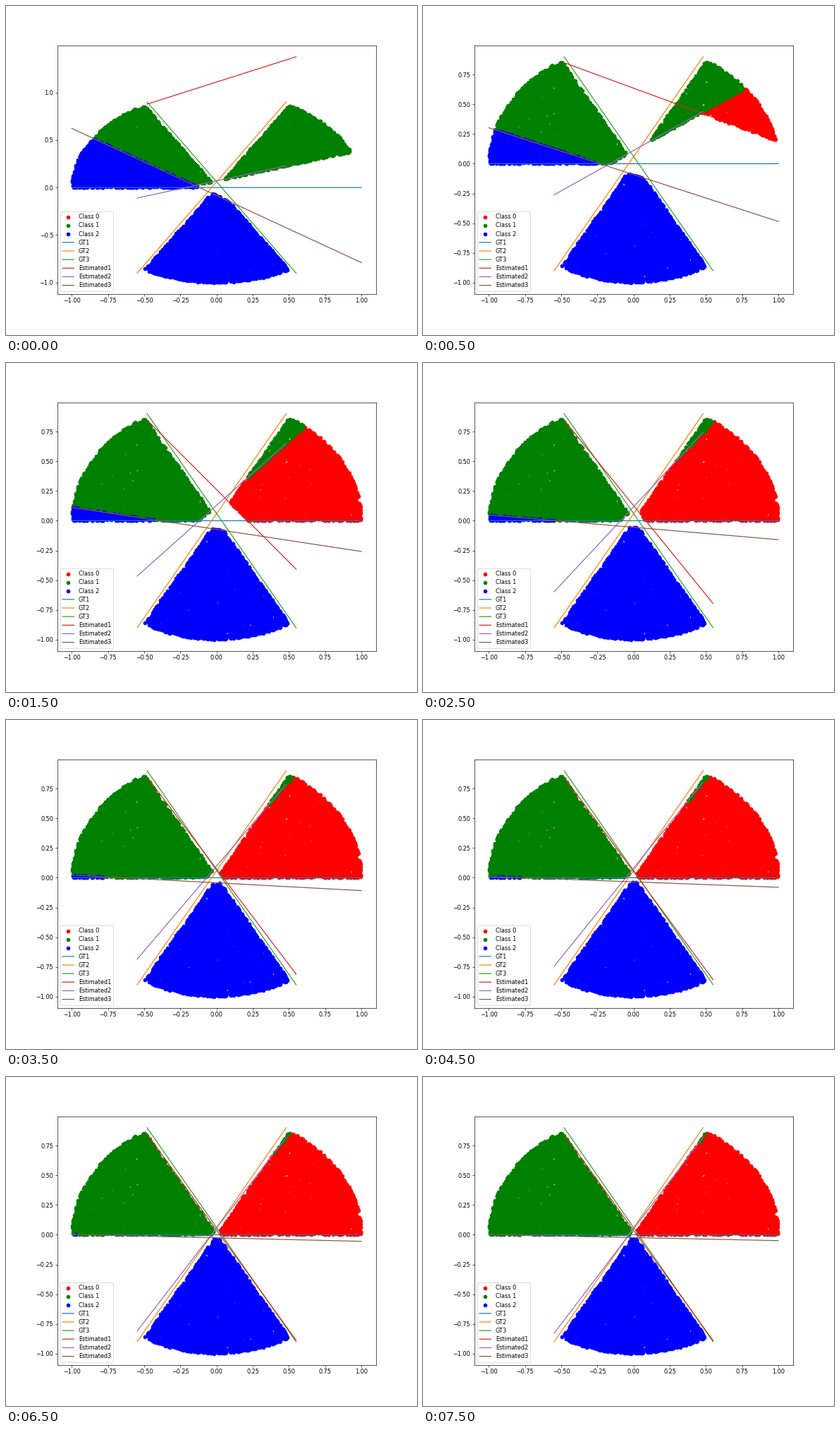
Recreate the animation shown at these times as a matplotlib script. Size 583x466 px, loop 8 s.

```python
import numpy as np
import matplotlib.pyplot as plt
from matplotlib.animation import FuncAnimation

DPI = 58.3
FRAMES, INTERVAL = 16, 500
PER_WEDGE = 5000

# Ground truth: y = +-SLOPE * x + OFFSET, drawn between y = -0.9 and 0.9
SLOPE, OFFSET, REACH = 1.75, 0.06, 0.9
LO, HI = (REACH + OFFSET) / SLOPE, (REACH - OFFSET) / SLOPE
RISING, FALLING, FLAT = (-LO, HI), (-HI, LO), (-1, 1)


def decay(step, start, end, rate, power):
    """Stretched exponential approach from start to end."""
    return end + (start - end) * np.exp(-rate * step ** power)


def estimates(step):
    """Span and end heights of the three fitted lines."""
    return (
        (FALLING, (decay(step, 0.878, 0.846, 2.0, 0.905),
                   decay(step, 1.376, -0.893, 0.57, 0.905))),
        (RISING, (decay(step, -0.11, -0.87, 0.222, 0.95),
                  decay(step, 0.228, 0.822, 0.44, 0.95))),
        (FLAT, (decay(step, 0.622, 0.0, 0.72, 0.785),
                decay(step, -0.79, -0.04, 0.52, 0.785))),
    )


def wedge(rng, start):
    angle = np.radians(start + 60 * rng.random(PER_WEDGE))
    radius = np.sqrt(rng.random(PER_WEDGE))
    return np.column_stack([radius * np.cos(angle), radius * np.sin(angle)])


def is_above(xs, ys):
    slope = (ys[1] - ys[0]) / (xs[1] - xs[0])
    return points[:, 1] > ys[0] + slope * (points[:, 0] - xs[0])


rng = np.random.default_rng(7)
points = np.vstack([wedge(rng, a) for a in (0, 120, 240)])

fig, ax = plt.subplots(figsize=(583 / DPI, 466 / DPI), dpi=DPI)
fig.subplots_adjust(left=0.125, right=0.9, bottom=0.125, top=0.88)
ax.set_xlim(-1.1, 1.1)

clouds = [ax.scatter([], [], color=c, label=f"Class {k}")
          for k, c in enumerate(("red", "green", "blue"))]

truths = ((FLAT, (0, 0)), (RISING, (-REACH, REACH)), (FALLING, (REACH, -REACH)))
for k, (xs, ys) in enumerate(truths, 1):
    ax.plot(xs, ys, label=f"GT{k}", snap=False)
lines = [ax.plot(xs, ys, label=f"Estimated{k}", snap=False)[0]
         for k, (xs, ys) in enumerate(estimates(0), 1)]

legend = ax.legend(loc="lower left", labelspacing=0.39)
for handle in legend.get_lines():
    handle.set_snap(False)


def update(step):
    fits = estimates(step)
    for line, (xs, ys) in zip(lines, fits):
        line.set_data(xs, ys)

    over1, over2, over3 = (is_above(xs, ys) for xs, ys in fits)
    groups = (over1 & ~over2 & over3, over2 & over3, ~over1 & ~over3)
    for cloud, mask in zip(clouds, groups):
        cloud.set_offsets(points[mask])

    top = max(REACH, *(max(ys) for _, ys in fits))
    pad = 0.05 * (top + 1)
    ax.set_ylim(-1 - pad, top + pad)
    return clouds + lines


anim = FuncAnimation(fig, update, frames=FRAMES, interval=INTERVAL,
                     repeat=True, repeat_delay=0, blit=False)
plt.show()
```
